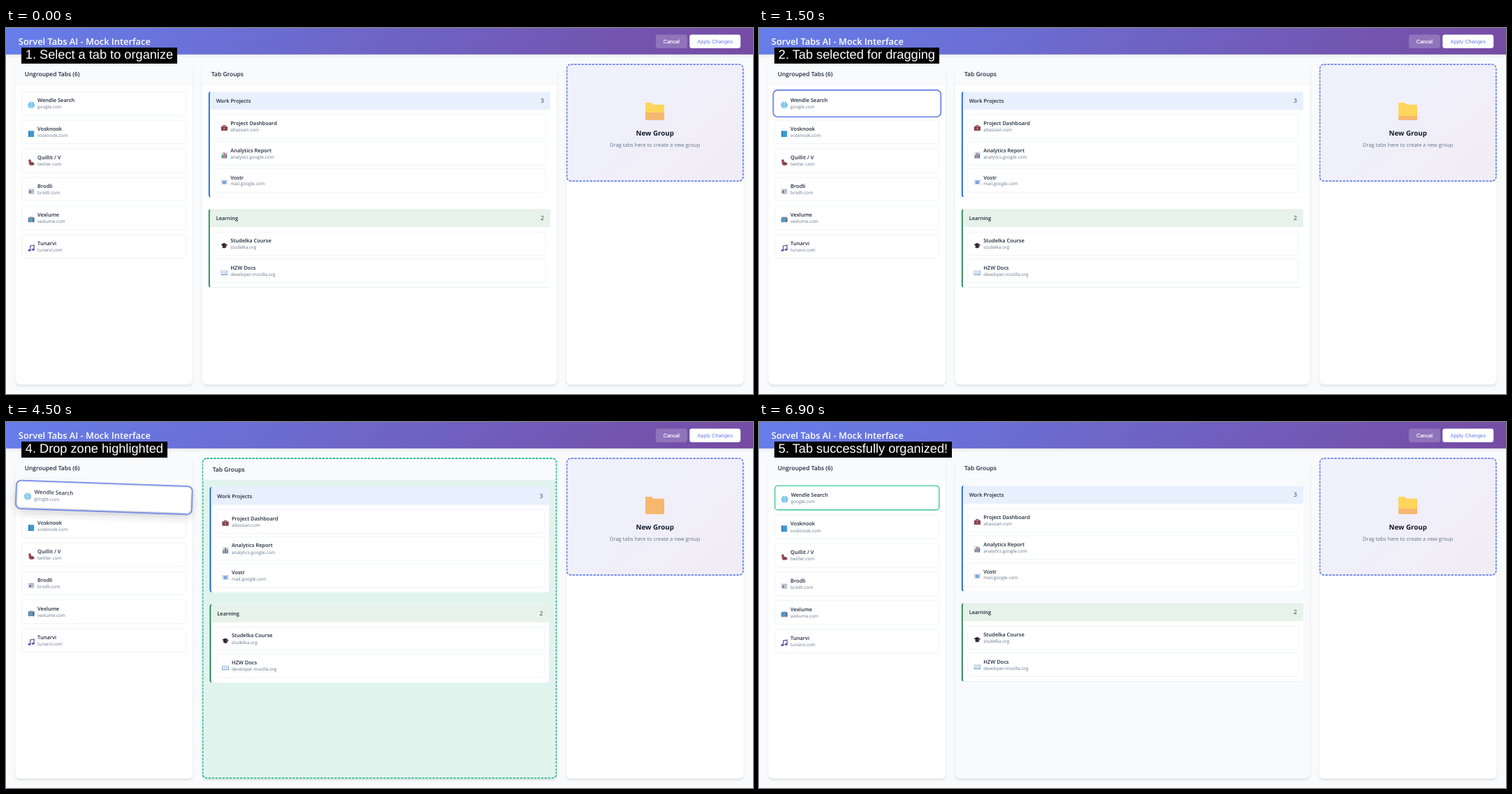
Write an HTML page that moves like this. It is 1069 px wide and 524 px high and loops after 7500 ms.

```html
<!DOCTYPE html>
<html lang="en">
<head>
<meta charset="utf-8">
<title>Tab organizer walkthrough</title>
<style>
  html, body { margin: 0; width: 100%; height: 100%; overflow: hidden; background: #f8fafc; }
  /* The interface is laid out at 1920 px wide and shown at 1069 px. */
  #stage {
    position: absolute; left: 0; top: 0; width: 1920px; height: 941px;
    transform: scale(calc(1069 / 1920)); transform-origin: 0 0;
    font-family: "Open Sans", sans-serif; color: #1e293b;
    text-rendering: geometricPrecision; white-space: nowrap;
  }
  #bar {
    position: absolute; left: 0; top: 0; width: 1920px; height: 68px;
    background: linear-gradient(135deg, #667eea, #764ba2);
    box-shadow: 0 2px 10px rgba(0, 0, 0, .1);
  }
  #bar b { position: absolute; left: 32px; font: 600 23.1px/71px "Open Sans", sans-serif; color: #fff; }
  .button {
    position: absolute; top: 16.5px; height: 35px; border-radius: 6px; text-align: center;
    font: 13.4px/35px "Liberation Sans", sans-serif;
  }
  .cancel { left: 1670px; width: 81px; background: rgba(255, 255, 255, .2); color: #fff; -webkit-text-stroke: .3px #fff; }
  .apply { left: 1757px; width: 131px; background: #fff; color: #667eea; }

  .panel {
    position: absolute; top: 92px; width: 456px; height: 825px; box-sizing: border-box;
    background: #fff; border-radius: 12px; box-shadow: 0 4px 6px rgba(0, 0, 0, .1);
  }
  .heading {
    height: 54px; padding-left: 24px; border-bottom: 1px solid #e2e8f0; border-radius: 12px 12px 0 0;
    background: #f8fafc; font-size: 15.2px; font-weight: 600; line-height: 54px;
  }
  .list { padding: 16px; }

  .tab {
    position: relative; height: 59.6px; margin-bottom: 12px;
    border: 1px solid #e2e8f0; border-radius: 8px; background: #fff;
  }
  .tab svg { position: absolute; left: 14.5px; top: 25px; width: 18px; height: 18px; }
  .tab b, .tab span { position: absolute; left: 40px; line-height: 20px; }
  .tab b { top: 11.7px; font-size: 13.4px; font-weight: 600; }
  .tab span { top: 30px; font-size: 11.5px; color: #64748b; }

  .group {
    margin-bottom: 29px; border: 1px solid #e2e8f0; border-left: 4px solid var(--edge);
    border-radius: 8px; background: #fff; overflow: hidden;
  }
  .group header {
    display: flex; justify-content: space-between; height: 46px; padding: 0 16px;
    background: var(--tint); font-size: 13.4px; font-weight: 600; line-height: 46px;
  }
  .group header span { font-size: 15.4px; font-weight: 400; color: #334155; }
  .group div.tabs { padding: 12px; }
  .group .tab { margin-bottom: 8px; }
  .group .tab:last-child { margin-bottom: 0; }

  #new {
    position: relative; box-sizing: border-box; height: 303px; text-align: center;
    border: 3px dashed #667eea; border-radius: 12px;
    background: linear-gradient(135deg, rgba(102, 126, 234, .1), rgba(118, 75, 162, .1));
  }
  #new b, #new span { position: absolute; left: 0; width: 100%; line-height: 24px; }
  #new b { top: 163px; font-size: 17.5px; color: #0f172a; }
  #new span { top: 193px; font-size: 13.45px; color: #64748b; }
  #folder {
    position: absolute; left: 200px; top: 97px; width: 49px; height: 45px;
    clip-path: path("M0 3Q0 0 3 0H16L22 5H46Q49 5 49 8V42Q49 45 46 45H3Q0 45 0 42Z");
    background: linear-gradient(#f6b76f var(--from), #ffd55a var(--from) var(--to), #f6b76f var(--to));
  }

  #caption {
    position: absolute; left: 22px; top: 28px; height: 23px; padding: 0 5.8px;
    background: #000; color: #fff; font: 18.2px/21px "Liberation Sans", sans-serif;
    text-rendering: geometricPrecision; white-space: nowrap;
  }

  .selected .first, .dragging .first, .dropping .first { outline: 3px solid #667eea; outline-offset: 2px; z-index: 1; }
  .dragging .first, .dropping .first {
    transform: rotate(2deg) scale(1.05); opacity: .9; box-shadow: 0 8px 25px rgba(0, 0, 0, .25);
  }
  .dropping #groups { border: 3px dashed #10b981; background: #e1f3ed; }
  .done .first { border: 2px solid #10b981; }
  .done #groups { background: #f8fafc; }
</style>
</head>
<body>
<div id="stage"></div>
<div id="caption"></div>
<script>
const stage = document.getElementById('stage');

// Icon artwork on a 10 by 10 grid.
const shape = (fill, d) => `<path fill="${fill}" d="${d}"/>`;
const line = (color, d, width = .7) => `<path fill="none" stroke="${color}" stroke-width="${width}" d="${d}"/>`;
const icons = {
  globe: '<circle cx="5" cy="5" r="4.7" fill="#48aee0"/>' +
    line('#d8f0fb', 'M.5 5H9.5M1.3 2.6H8.7M1.3 7.4H8.7M5 .3V9.7M5 .3Q.6 5 5 9.7Q9.4 5 5 .3', .6),
  book: shape('#3c9ad6', 'M1 .8H9V9.6H1Z') + shape('#2a73ad', 'M1 .8H2.4V9.6H1Z'),
  bird: shape('#9b4a55', 'M.6 2.8Q2.6-.6 4.6 2.5L5.2 5Q8.4 4.4 9.6 8L8 9.4H3Q.8 7.6 1.6 4Z') +
    shape('#5d4450', 'M4.4 5.2Q7 4.8 8 7.6L5.4 8Z') + line('#6b6470', 'M4 9V10M6 9V10'),
  news: shape('#d5d8e2', 'M.8 2H9.4V9.4H.4V4H.8Z') + shape('#6d7897', 'M2 4.8H4.8V7.6H2Z') +
    line('#8f96a8', 'M2 3.3H8.4M5.6 5.2H8.4M5.6 6.6H8.4M2 8.5H8.4'),
  tv: line('#6c7890', 'M3 .4L5 2.4L7 .4M2.6 8.4L1.8 9.8M7.4 8.4L8.2 9.8') +
    shape('#626c85', 'M.5 2.2H9.5V8.8H.5Z') + shape('#48a0d2', 'M1.5 3.2H7V7.8H1.5Z'),
  note: line('#6650a6', 'M3.6 8V1.8L8.9.8V7', 1.3) +
    '<ellipse cx="2.3" cy="8.1" rx="2" ry="1.6" fill="#6650a6"/><ellipse cx="7.6" cy="7.1" rx="2" ry="1.6" fill="#6650a6"/>',
  briefcase: line('#54303e', 'M3.4 3V1.4H6.6V3', .9) + shape('#8d4858', 'M.4 2.6H9.6V9H.4Z') +
    shape('#66323f', 'M.4 5.2H9.6V6H.4Z') + shape('#e5b95c', 'M4.3 5H5.7V6.5H4.3Z'),
  chart: shape('#d9dfea', 'M.5 .5H9.5V9.5H.5Z') + shape('#4b9a68', 'M1.4 4.6H3.4V9.5H1.4Z') +
    shape('#c75861', 'M4 1.6H6V9.5H4Z') + shape('#4084c8', 'M6.6 3.4H8.6V9.5H6.6Z'),
  mail: shape('#d4dcef', 'M.3 2H9.7V8.8H.3Z') + line('#a9b7d8', 'M.3 2L5 6L9.7 2', .6) +
    '<circle cx="5" cy="5.4" r="2.4" fill="#4d80ca"/>' + line('#e6eefb', 'M3.9 5.4H6.1Q6 4.2 5 4.2Q3.9 4.3 3.9 5.4Q4 6.7 5.8 6.4', .5),
  cap: shape('#3d3549', 'M2.2 5V8.2Q5 9.8 7.6 8V5Z') + shape('#251f30', 'M.2 3.8L5 1.6L9.9 4.6L5.2 7Z') +
    line('#d0863d', 'M5 4.2L8.6 5.4V8.2', .6),
  pages: shape('#4d8fce', 'M.2 2.4H9.8V9H.2Z') + shape('#e8eef7', 'M.8 1.8Q3.4 1.2 5 2.4Q6.6 1.2 9.2 1.8V8Q6.6 7.5 5 8.5Q3.4 7.5 .8 8Z') +
    line('#a4b5cf', 'M5 2.4V8.4M1.7 3.6H4M1.7 5.2H4M6 3.6H8.3M6 5.2H8.3', .5)
};

const tab = ([icon, title, address], extra = '') =>
  `<div class="tab ${extra}"><svg viewBox="0 0 10 10">${icons[icon]}</svg><b>${title}</b><span>${address}</span></div>`;
const group = (name, edge, tint, tabs) =>
  `<div class="group" style="--edge:${edge};--tint:${tint}"><header>${name}<span>${tabs.length}</span></header>
   <div class="tabs">${tabs.map(t => tab(t)).join('')}</div></div>`;

const loose = [
  ['globe', 'Wendle Search', 'google.com'],
  ['book', 'Vosknook', 'vosknook.com'],
  ['bird', 'Quillit / V', 'twitter.com'],
  ['news', 'Brodli', 'brodli.com'],
  ['tv', 'Vexlume', 'vexlume.com'],
  ['note', 'Tunarvi', 'tunarvi.com']
];
const work = [
  ['briefcase', 'Project Dashboard', 'atlassian.com'],
  ['chart', 'Analytics Report', 'analytics.google.com'],
  ['mail', 'Vostr', 'mail.google.com']
];
const learning = [
  ['cap', 'Studelka Course', 'studelka.org'],
  ['pages', 'HZW Docs', 'developer.mozilla.org']
];

stage.innerHTML = `
  <div id="bar"><b>Sorvel Tabs AI - Mock Interface</b>
    <div class="button cancel">Cancel</div><div class="button apply">Apply Changes</div></div>
  <div class="panel" style="left:24px"><div class="heading">Ungrouped Tabs (6)</div>
    <div class="list">${loose.map((t, i) => tab(t, i ? '' : 'first')).join('')}</div></div>
  <div class="panel" id="groups" style="left:504px;width:912px"><div class="heading">Tab Groups</div>
    <div class="list">${group('Work Projects', '#1967d2', '#e8f0fe', work)}
      ${group('Learning', '#218556', '#e6f2ea', learning)}</div></div>
  <div class="panel" style="left:1440px"><div id="new"><div id="folder"></div>
    <b>New Group</b><span>Drag tabs here to create a new group</span></div></div>`;

// Each step: state, caption, and the yellow band of the folder in percent.
const steps = [
  ['idle', '1. Select a tab to organize', 0, 56],
  ['selected', '2. Tab selected for dragging', 0, 76],
  ['dragging', '3. Dragging to new position', 28, 53],
  ['dropping', '4. Drop zone highlighted', 0, 0],
  ['done', '5. Tab successfully organized!', 0, 70]
];
const stepTime = 1500;
const caption = document.getElementById('caption');
const folder = document.getElementById('folder');
let shown = -1;

function draw(now) {
  const index = Math.floor(now / stepTime) % steps.length;
  if (index !== shown) {
    const [state, text, from, to] = steps[shown = index];
    stage.className = state;
    caption.textContent = text;
    folder.style.setProperty('--from', from + '%');
    folder.style.setProperty('--to', to + '%');
  }
  requestAnimationFrame(draw);
}
draw(performance.now());
</script>
</body>
</html>
```
